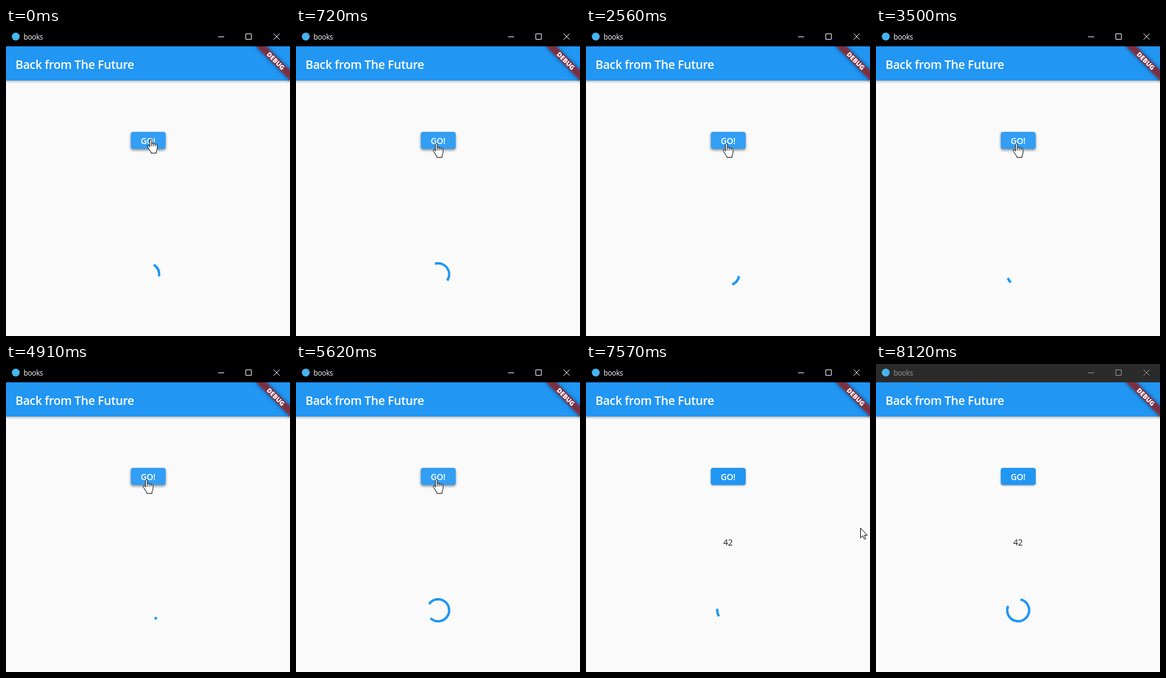
Recreate the animation shown at these times as an HTML page. Size 466 by 504 pixels, loop 8200 ms.

```html
<!DOCTYPE html>
<html lang="en">
<head>
<meta charset="utf-8">
<title>books</title>
<style>
  html, body { margin: 0; width: 100%; height: 100%; overflow: hidden; background: #fafafa; }
  svg { display: block; width: 466px; height: 504px; }
  text { font-family: "Open Sans", "Noto Sans", sans-serif; }
  .semi { font-weight: 600; fill: #fff; }
  .bar { filter: drop-shadow(0 1.5px 2px rgba(0, 0, 0, .36)); }
  #shade { filter: drop-shadow(0 1px 1.4px rgba(0, 0, 0, .38)); }
  #shade.raised { filter: drop-shadow(0 2px 2.2px rgba(0, 0, 0, .46)); }
  .ribbon-shadow { filter: blur(3px); }
  .titlebar { --ink: #fff; --back: #000; }
  .titlebar.idle { --ink: #999; --back: #2b2b2b; }
  .titlebar rect.back { fill: var(--back); }
  .titlebar text { fill: var(--ink); font-size: 11.8px; letter-spacing: -.25px; }
  .titlebar .icons { fill: none; stroke: var(--ink); }
  .pointer path { fill: #fff; stroke: #000; stroke-linejoin: round; }
</style>
</head>
<body>
<svg viewBox="0 0 466 504">
  <defs>
    <clipPath id="page"><rect y="30" width="466" height="474"/></clipPath>
  </defs>
  <rect width="466" height="504" fill="#fafafa"/>

  <g clip-path="url(#page)">
    <rect class="bar" x="-10" y="30" width="486" height="56" fill="#2196f3"/>
    <text class="semi" x="15.5" y="67" font-size="19.4" letter-spacing="-.34">Back from The Future</text>
    <g transform="translate(466.7 30) rotate(45)">
      <rect class="ribbon-shadow" x="-40" y="28" width="80" height="12" fill="#000" opacity=".5"/>
      <rect x="-40" y="28" width="80" height="12" fill="#b71c1c" fill-opacity=".627"/>
      <text x="0" y="37.8" font-size="10.6" font-weight="800" fill="#fff" text-anchor="middle">DEBUG</text>
    </g>
  </g>

  <g class="titlebar" id="titlebar">
    <rect class="back" width="466" height="30"/>
    <circle cx="16" cy="14" r="6.5" fill="#45b5ee"/>
    <text x="28.7" y="19">books</text>
    <path class="icons" d="M348 14.5h10M393.5 9.5h9v9h-9zM439 9l10 10M449 9l-10 10"/>
  </g>

  <rect id="shade" x="204.8" y="170" width="57.2" height="28" rx="4" fill="#2196f3"/>
  <rect id="overlay" x="204.8" y="170" width="57.2" height="28" rx="4" fill="#fff"/>
  <text class="semi" x="233" y="190" font-size="13.9" letter-spacing="-.3" text-anchor="middle">GO!</text>

  <text id="result" x="233" y="297" font-size="13.8" letter-spacing="-.2" fill="#212121" text-anchor="middle">42</text>
  <path id="spinner" fill="none" stroke="#2196f3" stroke-width="4" stroke-linecap="square"/>

  <g class="pointer" id="pointer">
    <g id="hand" transform="translate(-6.5 -.5)">
      <path d="M4.5 13V2Q4.5 .5 6 .5T7.5 2V8Q7.5 6.7 9 6.7T10.5 8.2Q10.5 7.3 12 7.4T13.5 9Q13.7 8.4 15 8.6T16.7 10.4V15Q16.7 18 15.2 20V23.3H6.5V21.5Q4 18.5 2.5 15.5L.8 12.8Q.2 11 1.5 10.6Q3 10.3 4.5 13Z"/>
      <path d="M7.5 8V12M10.5 8.2V12M13.5 9V12"/>
    </g>
    <path id="arrow" d="M.5 .5V16.5L4.2 13L6.7 18.7L9 17.7L6.6 12.2H11.5Z"/>
  </g>
</svg>

<script>
const LOOP = 8200;
// Start and end of each run of evenly spaced picture changes, in ms.
const RUNS = [[90, 880], [960, 1760], [1840, 2640], [2730, 3500], [3570, 4380],
  [4450, 5230], [5300, 6090], [6180, 6950], [7020, 7810], [7890, 8120]];
const RUN_STEPS = 11, LAST_STEPS = 4;

// Spinner: one stroke cycle takes 1333 ms, one turn 2222 ms.
const STEP_MS = 82.9, STROKE_MS = 1333, TURN_MS = 2222;
const STROKE_START = -0.88, TURN_START = 0.072;
const CX = 233.3, CY = 403, RADIUS = 18;

const PRESS = { 18: .12, 19: .2, 20: .24, 21: .24, 22: .12 };
const RESULT_AT = 79, LEAVE_AT = 89, GONE_AT = 100, IDLE_AT = 101;

const el = id => document.getElementById(id);
const clamp = v => Math.min(1, Math.max(0, v));
const smooth = v => v * v * (3 - 2 * v);
const show = (node, on) => node.setAttribute('visibility', on ? 'visible' : 'hidden');
const mix = (a, b, k) => a.map((v, i) => v + (b[i] - v) * k);

function stepAt(t) {
  const run = RUNS.findLastIndex(([start]) => t >= start);
  if (run < 0) return 0;
  const [start, end] = RUNS[run];
  const last = (run < RUNS.length - 1 ? RUN_STEPS : LAST_STEPS) - 1;
  const n = Math.floor((t - start) / (end - start) * last + .15);
  return 1 + run * RUN_STEPS + Math.min(last, n);
}

// cubic-bezier(.4, 0, .2, 1)
function fastOutSlowIn(x) {
  if (x <= 0 || x >= 1) return clamp(x);
  let lo = 0, hi = 1;
  for (let i = 0; i < 24; i++) {
    const m = (lo + hi) / 2;
    if (m * (1.2 - 1.8 * m + 1.6 * m * m) < x) lo = m; else hi = m;
  }
  return smooth(lo);
}

function drawSpinner(step) {
  const ms = step * STEP_MS;
  const stroke = STROKE_START + ms / STROKE_MS;
  const turn = TURN_START + ms / TURN_MS;
  const phase = stroke - Math.floor(stroke);
  const head = fastOutSlowIn(phase * 2);
  const tail = fastOutSlowIn(phase * 2 - 1);
  const from = Math.PI * (-.5 + 1.5 * tail + 2 * turn + .5 * phase);
  const sweep = Math.max(1.5 * Math.PI * (head - tail), .005);
  const point = a => `${(CX + RADIUS * Math.cos(a)).toFixed(3)} ${(CY + RADIUS * Math.sin(a)).toFixed(3)}`;
  const large = sweep > Math.PI ? 1 : 0;
  el('spinner').setAttribute('d',
    `M${point(from)}A${RADIUS} ${RADIUS} 0 ${large} 1 ${point(from + sweep)}`);
}

function pointerAt(step) {
  const rest = [231, 189];
  return step < LEAVE_AT
    ? mix([238, 182], rest, smooth(clamp((step - 1) / 5)))
    : mix(rest, [450, 268], smooth(clamp((step - LEAVE_AT) / 6)));
}

function draw(t) {
  const step = stepAt(t);
  const [x, y] = pointerAt(step);
  const hover = x < 262 && y < 198;

  drawSpinner(step);
  el('pointer').setAttribute('transform', `translate(${Math.round(x)} ${Math.round(y)})`);
  show(el('pointer'), step < GONE_AT);
  el('hand').style.display = hover ? '' : 'none';
  el('arrow').style.display = hover ? 'none' : '';
  el('overlay').setAttribute('opacity', hover ? PRESS[step] ?? .08 : 0);
  el('shade').classList.toggle('raised', hover);
  show(el('result'), step >= RESULT_AT);
  el('titlebar').classList.toggle('idle', step >= IDLE_AT);
}

function tick() {
  draw(performance.now() % LOOP);
  requestAnimationFrame(tick);
}
tick();
</script>
</body>
</html>
```
